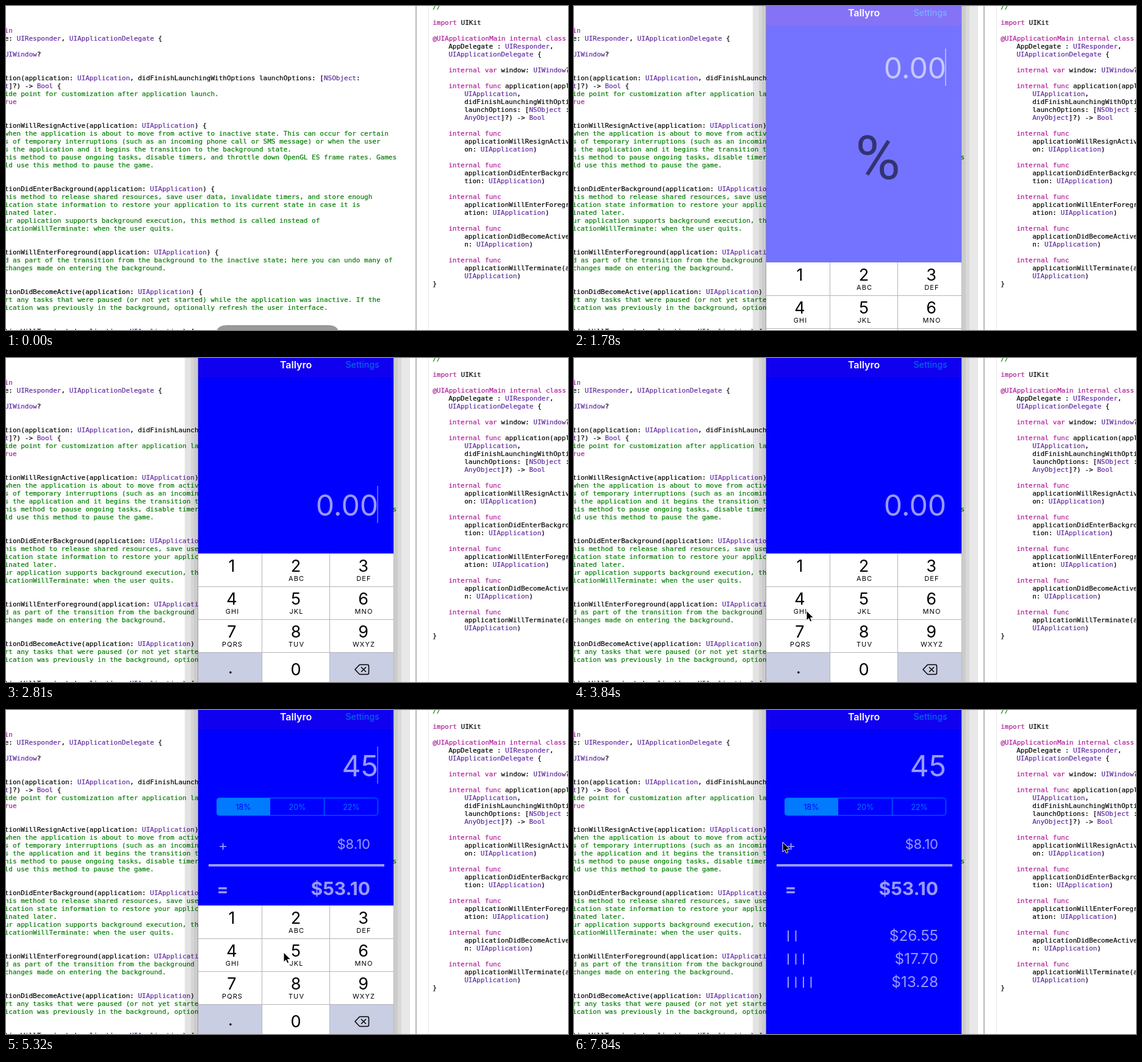
These frames come from a looping animation (921 by 532 pixels, 7.99 s). An HTML page:

```html
<!DOCTYPE html>
<html lang="en">
<head>
<meta charset="utf-8">
<title>Tip calculator demo</title>
<style>
html, body { margin: 0; width: 100%; height: 100%; overflow: hidden; background: #fff; }
svg { display: block; }
text { white-space: pre; }
.code text { font: 11px "DejaVu Sans Mono", monospace; }
.code text, .code tspan { fill: currentColor; stroke: currentColor; stroke-width: .2px; }
.app text { font-family: Inter, Roboto, sans-serif; }
.soft { fill: #9999ff; }
.end { text-anchor: end; }
.mid { text-anchor: middle; }
.digit { font-size: 27px; }
.letters { font-size: 11px; letter-spacing: 1.1px; }
</style>
</head>
<body>
<svg id="stage" width="921" height="532" viewBox="0 0 921 532">
  <rect width="921" height="532" fill="#fff"/>
  <g class="code" id="left"></g>
  <rect x="671" width="2" height="532" fill="#b8b8b8"/>
  <rect x="692" width="1" height="532" fill="#e8e8e8"/>
  <g class="code" id="right"></g>
  <path id="pill" d="M346 532Q349 524 362 524H528Q541 524 544 532Z" fill="#999"/>
  <g id="phone">
    <g id="shade"></g>
    <svg class="app" x="315" width="320" height="532" viewBox="315 0 320 532">
      <rect x="315" width="320" height="532" fill="#00f"/>
      <rect id="bar" x="315" width="320" height="33"/>
      <rect x="315" y="32" width="320" height="1" opacity=".2"/>
      <text class="mid" x="475" y="17" font-size="16" font-weight="600" fill="#fff">Tallyro</text>
      <text class="end" id="settings" x="611.5" y="16" font-size="14.3">Settings</text>
      <g id="results">
        <rect x="345.5" y="144.5" width="264" height="28.5" rx="4" fill="none" stroke="#007aff"/>
        <path d="M433 144.5H349.500Q345.500 144.500 345.500 148.500V169Q345.500 173 349.500 173H433Z" fill="#007aff"/>
        <path d="M521.500 145V173" stroke="#007aff"/>
        <g class="mid" font-size="12.5" fill="#007aff">
          <text x="389" y="163.500" fill="#00f">18%</text>
          <text x="477.500" y="163.500">20%</text>
          <text x="566" y="163.500">22%</text>
        </g>
        <g class="soft">
          <text class="mid" x="355.500" y="230.500" font-size="23">+</text>
          <text class="end" id="tip" x="597" y="228" font-size="22"></text>
          <rect x="332" y="253" width="288" height="4"/>
          <text class="mid" x="355" y="303.500" font-size="28" font-weight="700">=</text>
          <text class="end" id="total" x="597" y="304" font-size="30" font-weight="700"></text>
          <g id="splits"></g>
        </g>
      </g>
      <g id="entry">
        <text class="soft end" id="bill" x="610" y="258.500" font-size="48"></text>
        <rect id="caret" x="608" y="210" width="2" height="61" fill="#fff"/>
      </g>
      <rect id="cover" x="315" width="320" height="532" fill="#fff"/>
      <text class="mid" id="logo" x="498" y="284" font-size="101" style="font-family: Roboto, sans-serif">%</text>
      <g id="keys"></g>
    </svg>
    <path id="mouse" d="M0 0V16L3.700 12.600L6 18L8.700 16.900L6.400 11.500H11.500Z" fill="#000" stroke="#fff"/>
  </g>
</svg>
<script>
const LOOP = 7990, TICK = 147.96;
const $ = id => document.getElementById(id);
const set = (id, attrs) => { for (const k in attrs) $(id).setAttribute(k, attrs[k]); };
const show = (id, on) => set(id, { display: on ? "inline" : "none" });

// «type» is purple, ‹keyword› magenta; a leading # makes a whole line a comment
const INK = { "«": "#5f2a9f", "‹": "#b01898" };
const INDENT = 6.5;

function drawCode(id, x, firstBase, source) {
  $(id).innerHTML = source.split("\n").map((line, row) => {
    if (!line.trim()) return "";
    const comment = line[0] === "#";
    const body = line.replace(/^#/, "");
    const indent = body.length - body.trimStart().length;
    const spans = body.trim().replace(/>/g, "&gt;")
      .replace(/([«‹])([^»›]*)[»›]/g, (m, mark, word) => `<tspan color="${INK[mark]}">${word}</tspan>`);
    return `<text x="${x + indent * INDENT}" y="${firstBase + row * 13}" color="${comment ? "#007c00" : "#000"}">${spans}</text>`;
  }).join("");
}

drawCode("left", -2.3, 44, `‹in›
e: «UIResponder», «UIApplicationDelegate» {

«UIWindow»?


tion(application: «UIApplication», didFinishLaunchingWithOptions launchOptions: [«NSObject»:
«t»]?) -> «Bool» {
#ide point for customization after application launch.
‹rue›


tionWillResignActive(application: «UIApplication») {
#when the application is about to move from active to inactive state. This can occur for certain
#s of temporary interruptions (such as an incoming phone call or SMS message) or when the user
#s the application and it begins the transition to the background state.
#his method to pause ongoing tasks, disable timers, and throttle down OpenGL ES frame rates. Games
#ld use this method to pause the game.


tionDidEnterBackground(application: «UIApplication») {
#his method to release shared resources, save user data, invalidate timers, and store enough
#ication state information to restore your application to its current state in case it is
#inated later.
#ur application supports background execution, this method is called instead of
#icationWillTerminate: when the user quits.


tionWillEnterForeground(application: «UIApplication») {
#d as part of the transition from the background to the inactive state; here you can undo many of
#changes made on entering the background.


tionDidBecomeActive(application: «UIApplication») {
#rt any tasks that were paused (or not yet started) while the application was inactive. If the
#ication was previously in the background, optionally refresh the user interface.


tionWillTerminate(application: «UIApplication») {`);

drawCode("right", 699.2, 5, `#//

‹import› UIKit

‹@UIApplicationMain› ‹internal› ‹class›
    AppDelegate : «UIResponder»,
    «UIApplicationDelegate» {

    ‹internal› ‹var› window: «UIWindow»?

    ‹internal› ‹func› application(application:
        «UIApplication»,
        didFinishLaunchingWithOptions
        launchOptions: [«NSObject» :
        «AnyObject»]?) -> «Bool»

    ‹internal› ‹func›
        applicationWillResignActive(applicati
        on: «UIApplication»)

    ‹internal› ‹func›
        applicationDidEnterBackground(applica
        tion: «UIApplication»)

    ‹internal› ‹func›
        applicationWillEnterForeground(applic
        ation: «UIApplication»)

    ‹internal› ‹func›
        applicationDidBecomeActive(applicatio
        n: «UIApplication»)

    ‹internal› ‹func›
        applicationWillTerminate(application:
        «UIApplication»)
}`);

// Stepped window shadow: x, width, darkness
$("shade").innerHTML = [
  [293, 10, .11], [303, 5, .16], [308, 6, .2], [314, 1, .4],
  [635, 1, .28], [636, 6, .2], [642, 6, .15], [648, 14, .09]
].map(([x, w, a]) => `<rect x="${x}" width="${w}" height="532" opacity="${a}"/>`).join("");

const label = (cls, x, y, s) => `<text class="mid ${cls}" x="${x}" y="${y}">${s}</text>`;

function drawKeys() {
  const letters = ["", "ABC", "DEF", "GHI", "JKL", "MNO", "PQRS", "TUV", "WXYZ"];
  const cols = [370, 475, 585.5];
  let s = `<rect x="315" y="321" width="320" height="216" fill="#fff"/>
    <path d="M315 484H419V537H315ZM531 484H635V537H531Z" fill="#c9cee2"/>
    <path d="M315 375.500H635M315 429.500H635M315 483.500H635M419.500 321V537M530.500 321V537" stroke="#b4b5ba"/>`;
  letters.forEach((word, i) => {
    const x = cols[i % 3], y = 351 + 54 * Math.floor(i / 3);
    s += label("digit", x, y, i + 1) + label("letters", x + 1, y + 15, word);
  });
  s += label("digit", 475, 520.5, 0) + label("digit", 368, 518, ".");
  s += `<path d="M572 511.500L578.500 504.500Q579.500 503.500 581 503.500H592Q594.500 503.500 594.500 506V517Q594.500 519.500 592 519.500H581Q579.500 519.500 578.500 518.500ZM582 507.500L590 515.500M590 507.500L582 515.500" fill="none" stroke="#000" stroke-width="1.500"/>`;
  $("keys").innerHTML = s;
}
drawKeys();

$("splits").innerHTML = [2, 3, 4].map((n, row) => {
  const y = 379 + row * 38;
  let bars = "";
  for (let i = 0; i < n; i++) bars += `<rect x="${350 + i * 12.5}" y="${y - 17}" width="2" height="18"/>`;
  return bars + `<text class="end" id="split${n}" x="597" y="${y}" font-size="24.3"></text>`;
}).join("");

const money = v => "$" + (Math.round(v * 100 + 1e-6) / 100).toFixed(2);

// Linear interpolation through [tick, value] points
function at(k, points) {
  if (k <= points[0][0]) return points[0][1];
  for (let i = 1; i < points.length; i++) {
    const [a, u] = points[i - 1], [b, v] = points[i];
    if (k <= b) return u + (v - u) * (k - a) / (b - a);
  }
  return points[points.length - 1][1];
}

const ENTRY_Y = [[12, -140], [13, -73], [14, -18], [15, -4], [16, 0], [28, 0], [29, -95], [30, -150]];
const KEYS_Y = [[11, 216], [12, 100], [13, 12], [14, 3], [15, 0], [49, 0], [50, 125], [51, 216]];
const MOUSE_X = [[21, 316], [24, 374], [28, 388], [29, 410], [30, 452], [32, 455], [36, 455], [37, 453], [42, 453], [43, 440], [44, 392], [45, 348], [47, 336], [49, 330], [52, 330], [53, 342]];
const MOUSE_Y = [[21, 167], [24, 433], [26, 415], [28, 408], [30, 396], [32, 398], [42, 398], [43, 370], [44, 275], [45, 197], [49, 190], [52, 190], [53, 217]];
const CARET_ON = [[12, 16], [19, 21], [23, 26], [29, 32], [36, 40], [42, 44]];

function render(ms) {
  // The screen refreshes in even steps
  const k = Math.min(53, Math.floor((ms + 14) / TICK));
  const bill = k < 29 ? 0 : k < 36 ? 4 : 45;
  const total = bill * 1.18;

  set("pill", { opacity: at(k, [[0, 1], [4, 0]]) });
  show("phone", k >= 11);
  show("mouse", k >= 21);
  set("mouse", { transform: `translate(${at(k, MOUSE_X)} ${at(k, MOUSE_Y)})` });

  set("cover", { opacity: at(k, [[11, 1], [12, .45], [13, 0]]) });
  set("logo", { opacity: at(k, [[11, 1], [12, .55], [13, .1], [14, 0]]) });
  set("bar", { fill: k < 14 ? "#2000f0" : "#1000f0" });
  set("settings", { fill: k < 14 ? "#0080ff" : "#0074e4" });
  set("keys", { transform: `translate(0 ${at(k, KEYS_Y)})` });

  set("entry", { transform: `translate(0 ${at(k, ENTRY_Y)})` });
  set("caret", { opacity: CARET_ON.some(([a, b]) => k >= a && k < b) ? (k < 16 ? .45 : .35) : 0 });
  set("results", { opacity: at(k, [[28, 0], [30, 1]]) });

  $("bill").textContent = bill || "0.00";
  $("tip").textContent = money(total - bill);
  $("total").textContent = money(total);
  for (const n of [2, 3, 4]) $("split" + n).textContent = money(total / n);
}

const start = performance.now();
function loop() {
  render((performance.now() - start) % LOOP);
  requestAnimationFrame(loop);
}
loop();
</script>
</body>
</html>
```
